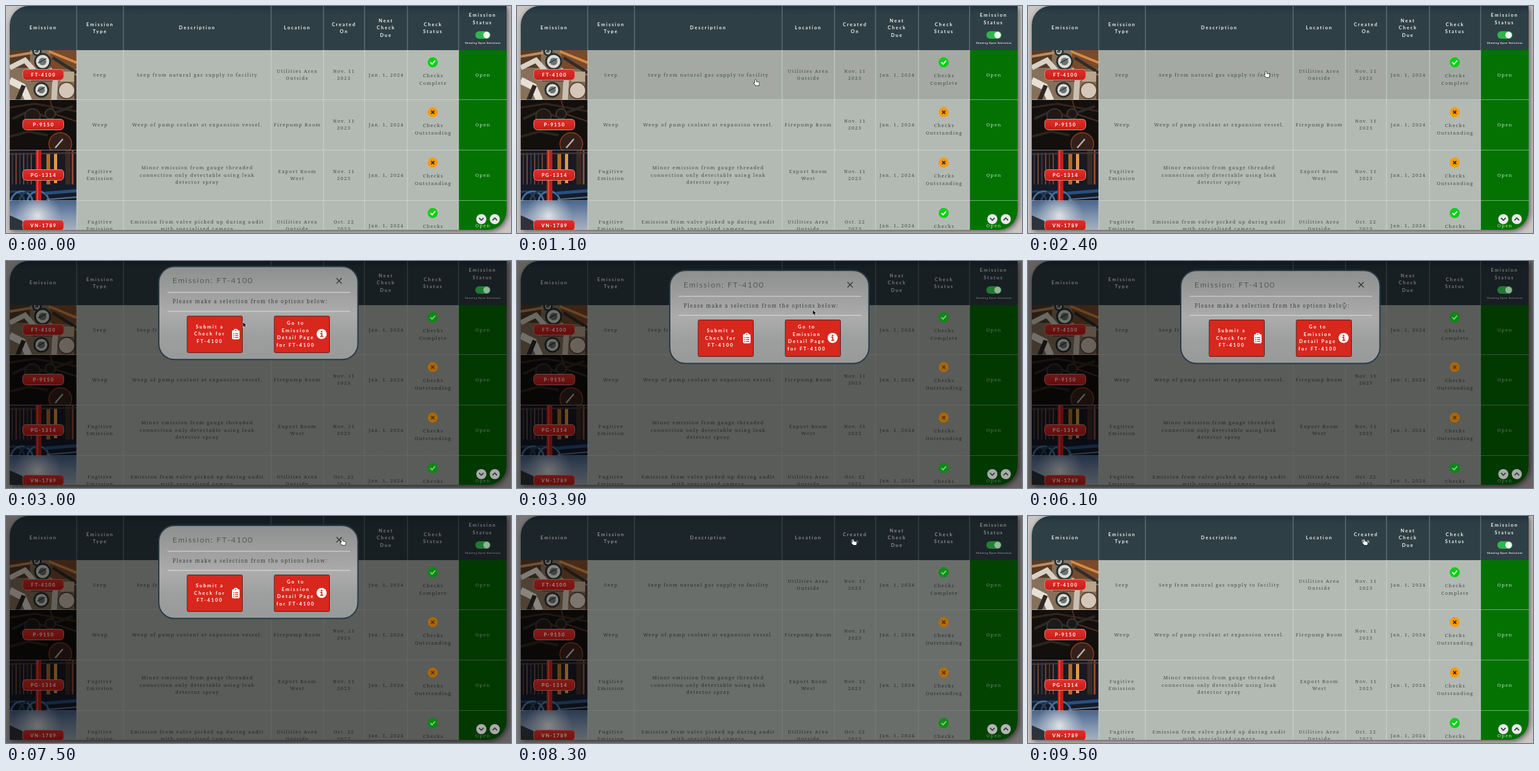
An HTML page with a canvas that plays this animation: 800 by 360 pixels, repeating every 9600 ms.

```html
<!DOCTYPE html>
<html lang="en">
<head>
<meta charset="utf-8">
<title>Emissions</title>
<style>
html, body { margin: 0; width: 100%; height: 100%; overflow: hidden; background: #cbc5c3; }
canvas { display: block; }
</style>
</head>
<body>
<canvas id="stage" width="800" height="360"></canvas>
<script>
const ctx = document.getElementById('stage').getContext('2d');
const LOOP = 9600;
const COLS = [6, 112, 186, 420, 503, 568, 636, 717, 793];
const ROWS = [70, 149, 229, 309, 389];
const BOTTOM = 355;
const LEADING = 11.5;

const SANS = 'Lato, sans-serif', SERIF = '"Noto Serif", serif';
const HEAD = { font: `bold 7.5px ${SANS}`, spacing: 1.75, color: '#f0f3f3' };
const BODY = { font: `300 7.5px ${SERIF}`, spacing: 1.3, color: '#454a47' };
const OPEN = { ...BODY, color: '#c6dcc4' };
const TAG = { ...HEAD, spacing: 1.55, color: '#fff' };
const ACTION = { ...HEAD, spacing: 1.9, color: '#fff' };
const TINY = { font: `bold 4px ${SANS}`, spacing: 0.55, color: '#fff' };
const TITLE = { font: `300 12.5px ${SANS}`, spacing: 1.6, color: '#22282b', drop: 4.5 };
const PROMPT = { font: `300 8px ${SERIF}`, spacing: 1.35, color: '#3c4042' };

const headings = ['Emission', 'Emission|Type', 'Description', 'Location', 'Created|On',
  'Next|Check|Due', 'Check|Status', 'Emission|Status'];
const records = [
  { tag: 'FT-4100', done: true, photo: gauges,
    cells: ['Seep', 'Seep from natural gas supply to facility', 'Utilities Area|Outside', 'Nov. 11|2023'] },
  { tag: 'P-9150', done: false, photo: pump,
    cells: ['Weep', 'Weep of pump coolant at expansion vessel.', 'Firepump Room', 'Nov. 11|2023'] },
  { tag: 'PG-1314', done: false, photo: pipework,
    cells: ['Fugitive|Emission', 'Minor emission from gauge threaded|connection only detectable using leak|detector spray', 'Export Room|West', 'Nov. 11|2023'] },
  { tag: 'VN-1789', done: true, photo: sky,
    cells: ['Fugitive|Emission', 'Emission from valve picked up during audit|with specialised camera', 'Utilities Area|Outside', 'Oct. 22|2023'] }
];

const clamp = v => Math.max(0, Math.min(1, v));
const ramp = (t, from, to) => clamp((t - from) / (to - from));
const easeOut = p => 1 - (1 - p) ** 2;
const smooth = p => p * p * (3 - 2 * p);

function rect(x, y, w, h, fill) {
  ctx.fillStyle = fill;
  ctx.fillRect(x, y, w, h);
}

function paint(fill, stroke, width) {
  if (fill) { ctx.fillStyle = fill; ctx.fill(); }
  if (stroke) { ctx.strokeStyle = stroke; ctx.lineWidth = width; ctx.stroke(); }
}

function box(x, y, w, h, radii, fill, stroke, width = 1) {
  ctx.beginPath();
  ctx.roundRect(x, y, w, h, radii);
  paint(fill, stroke, width);
}

function disc(x, y, r, fill, stroke, width = 1) {
  ctx.beginPath();
  ctx.arc(x, y, r, 0, Math.PI * 2);
  paint(fill, stroke, width);
}

function line(points, color, width) {
  ctx.beginPath();
  for (let i = 0; i < points.length; i += 2) ctx.lineTo(points[i], points[i + 1]);
  paint(null, color, width);
}

function vertical(y0, y1, ...colors) {
  const g = ctx.createLinearGradient(0, y0, 0, y1);
  colors.forEach((c, i) => g.addColorStop(i / (colors.length - 1), c));
  return g;
}

function text(str, x, y, style, align = 'center') {
  const lines = str.split('|');
  ctx.font = style.font;
  ctx.letterSpacing = style.spacing + 'px';
  ctx.fillStyle = style.color;
  ctx.textAlign = align;
  lines.forEach((s, i) =>
    ctx.fillText(s, x, y + (i - (lines.length - 1) / 2) * LEADING + (style.drop || 2.6)));
}

// Row pictures, drawn in a 106 x 80 cell
function dial(x, y, r) {
  disc(x, y, r, '#dcdcd6', '#2b3130', 3);
  disc(x, y, r * 0.5, '#6d7472');
  line([x - r * 0.6, y + r * 0.2, x + r * 0.5, y - r * 0.4], '#2b3130', 1.2);
}

function gauges() {
  rect(0, 0, 106, 80, '#86705a');
  rect(0, 0, 32, 28, '#553c29');
  rect(64, 0, 42, 30, '#7a4a2a');
  line([0, 10, 36, 4], '#c08a5c', 4);
  line([62, 2, 106, 20], '#d38b48', 4);
  line([68, 12, 106, 36], '#2f2d2a', 5);
  line([0, 28, 24, 16, 40, 34], '#d8d2c6', 8);
  line([70, 80, 72, 46, 62, 30], '#c9bfb2', 9);
  line([0, 48, 20, 58, 30, 80], '#e6e0d6', 11);
  line([12, 80, 22, 56], '#2d2825', 7);
  rect(34, 38, 34, 12, '#5c5146');
  rect(44, 30, 16, 16, '#88857d');
  dial(52, 18, 12);
  dial(43, 2, 6);
  dial(50, 63, 11);
  rect(80, 34, 22, 16, '#b9a48c');
  disc(90, 64, 13, '#d4c6b8', '#5d4837', 2);
  rect(102, 40, 4, 40, '#4a3a2e');
}

function pump() {
  rect(0, 0, 106, 80, '#120f0d');
  line([0, 12, 40, 6, 106, 18], '#36241b', 3);
  line([4, 30, 30, 18, 56, 26, 100, 10], '#2b2826', 4);
  line([64, 0, 70, 22, 106, 34], '#4b3024', 2);
  disc(36, 26, 12, '#1d1a18', '#38332f', 2);
  disc(64, 22, 8, '#1b1917', '#403831', 2);
  line([0, 58, 30, 50, 60, 56], '#2b241f', 4);
  disc(80, 70, 18, '#33201a', '#8f3c1c', 1.5);
  line([72, 76, 84, 62], '#b8b2a8', 2.5);
}

function pipework() {
  rect(0, 0, 106, 80, '#1a1921');
  for (let i = 0; i < 6; i++) rect(3 + i * 6, 4, 2, 50, i % 2 ? '#6c4632' : '#393640');
  rect(58, 5, 6, 50, '#b26a25');
  rect(70, 4, 5, 48, '#dc9a48');
  rect(88, 0, 8, 60, '#3b2a27');
  rect(98, 0, 3, 56, '#8a4930');
  line([0, 6, 106, 4], '#4b3839', 2);
  rect(0, 54, 106, 26, '#161b28');
  for (let i = 0; i < 4; i++) disc(6 + i * 13, 82, 17, null, i % 2 ? '#456f99' : '#223f60', 3);
  line([56, 68, 106, 64], '#284f7e', 5);
  line([58, 78, 106, 74], '#55789a', 2);
  rect(41, 0, 9, 80, '#bd201c');
  rect(43, 0, 2, 80, '#e24a3a');
}

function sky() {
  rect(0, 0, 106, 80, vertical(0, 48, '#4a658e', '#7f92ad', '#aab3bf'));
  const glow = ctx.createRadialGradient(44, 24, 2, 44, 24, 38);
  glow.addColorStop(0, 'rgba(228,230,231,.9)');
  glow.addColorStop(1, 'rgba(200,208,218,0)');
  rect(0, 0, 106, 80, glow);
  ctx.fillStyle = '#2e333b';
  ctx.beginPath();
  [[0, 23], [20, 32], [26, 48], [0, 48]].forEach(p => ctx.lineTo(...p));
  ctx.fill();
}

function statusIcon(x, y, done) {
  disc(x, y, 8, done ? '#0bd016' : '#ff9a0a');
  if (done) line([x - 3.7, y, x - 1, y + 2.8, x + 3.8, y - 2.6], '#fff', 1.8);
  else {
    line([x - 2.5, y - 2.5, x + 2.5, y + 2.5], '#2c2b28', 1.7);
    line([x + 2.5, y - 2.5, x - 2.5, y + 2.5], '#2c2b28', 1.7);
  }
}

function toggle() {
  box(743.5, 40, 24, 12, 6, '#2fb64b');
  disc(761.3, 46, 5.2, '#f3f6f3');
}

function brightParts() {
  toggle();
  records.forEach((r, i) => statusIcon(676, ROWS[i] + 19.3, r.done));
}

function header() {
  rect(6, 0, 787, 70.5, vertical(0, 14, '#1f303a', '#2a3b44', '#2f3f46'));
  headings.forEach((h, i) =>
    text(h, (COLS[i] + COLS[i + 1]) / 2, i === 7 ? 20.5 : 34.7, HEAD));
  text('Showing Open Emissions', 755.5, 57.3, TINY);
  for (const x of COLS.slice(1, -1)) rect(x - 0.5, 0, 1, 70, '#76828a');
}

function row(rec, i, hovered) {
  const top = ROWS[i], height = ROWS[i + 1] - top, mid = top + 39;
  rect(6, top, 711, height, hovered ? '#a4aaa3' : '#b3bab4');
  rect(717, top, 76, height, '#037203');

  ctx.save();
  ctx.beginPath();
  ctx.rect(6, top, 106, height);
  ctx.clip();
  ctx.translate(6, top);
  rec.photo();
  ctx.restore();

  box(26.5, mid - 8.5, 65, 17, [5, 5, 6, 6], vertical(mid - 9, mid + 9, '#e2302a', '#c51d18'), '#d98a82');
  text(rec.tag, 59.5, mid, TAG);
  rec.cells.forEach((c, n) => text(c, (COLS[n + 1] + COLS[n + 2]) / 2, mid, BODY));
  text('Jan. 1, 2024', 602.5, mid, BODY);
  text('Checks|' + (rec.done ? 'Complete' : 'Outstanding'), 676.8, top + 46.5, BODY);
  text('Open', 755.5, mid, OPEN);
  for (const x of COLS.slice(1, -1)) rect(x - 0.5, top, 1, height, 'rgba(222,228,224,.65)');
  if (i) {
    ctx.setLineDash([1, 1]);
    line([6, top - 0.5, 793, top - 0.5], '#dfe4e0', 1);
    ctx.setLineDash([]);
  }
}

function table(hoverRow) {
  rect(0, 0, 800, 360, '#cbc5c3');
  ctx.save();
  ctx.shadowColor = 'rgba(0,0,0,.6)';
  ctx.shadowBlur = 8;
  ctx.shadowOffsetX = ctx.shadowOffsetY = 2;
  box(6, 0, 787, BOTTOM, [30, 0, 30, 0], '#b3bab4');
  ctx.restore();

  ctx.save();
  ctx.beginPath();
  ctx.roundRect(6, 0, 787, BOTTOM, [30, 0, 30, 0]);
  ctx.clip();
  header();
  records.forEach((r, i) => row(r, i, i === hoverRow));
  brightParts();
  ctx.restore();
}

function scrollButtons(dim) {
  const shade = 232 - 62 * dim;
  for (const [x, dir] of [[753, 1], [774.3, -1]]) {
    disc(x, 338, 8, `rgb(${shade},${shade},${shade})`);
    line([x - 3.6, 338 - 1.8 * dir, x, 338 + 1.8 * dir, x + 3.6, 338 - 1.8 * dir], '#30383b', 1.7);
  }
}

function modal(dy, alpha) {
  ctx.save();
  ctx.globalAlpha = alpha;
  ctx.translate(0, dy);
  box(242, 15, 315.5, 147.5, 25, vertical(15, 163, '#8d8f8f', '#9c9d9c', '#abacab', '#9d9e9e', '#989a9a'), '#293b49', 2);
  text('Emission: FT-4100', 264, 37, TITLE, 'left');
  line([523.5, 33.5, 531.8, 41.8], '#33383b', 1.4);
  line([531.8, 33.5, 523.5, 41.8], '#33383b', 1.4);
  rect(256, 55.5, 289, 1, '#dedede');
  rect(256, 85.7, 289, 1, '#dedede');
  text('Please make a selection from the options below:', 264, 71, PROMPT, 'left');

  for (const x of [287, 425]) box(x, 93.5, 87.5, 58, 2, '#d8271d', '#51201d');
  text('Submit a|Check for|FT-4100', 322.8, 122, ACTION);
  text('Go to|Emission|Detail Page|for FT-4100', 459, 122, ACTION);

  box(358, 116, 12, 14.5, 2, '#fff');
  box(361, 114, 6, 4.5, 1.5, '#fff');
  disc(364, 116.3, 0.9, '#d8271d');
  for (const y of [121, 124, 127]) {
    rect(360, y, 1.5, 1.4, '#d8271d');
    rect(362.8, y, 5.2, 1.2, '#d8271d');
  }
  disc(500, 122, 8, '#fff');
  disc(500, 118.2, 1.3, '#d8271d');
  line([498, 121.2, 500.3, 121.2, 500.3, 125.6], '#d8271d', 1.7);
  line([497.7, 125.7, 502.6, 125.7], '#d8271d', 1.6);
  ctx.restore();
}

const CURSORS = {
  hand: 'M0 .8 Q0 0 .9 0 Q1.7 0 1.7 .8 V3.2 L5.8 3.9 Q6.7 4.2 6.6 5.3 L6 9 H1.4 L-1.9 5.5 Q-2 4.6 -1 4.7 L0 5.4 Z',
  arrow: 'M0 0 V7.2 L1.7 5.7 L2.9 8.3 L4 7.8 L2.9 5.2 H5.1 Z'
};

function cursor(kind, x, y) {
  ctx.save();
  ctx.translate(x, y);
  if (kind === 'beam') {
    line([0, -4, 0, 4], '#eee', 2.4);
    line([-1.5, -4, 1.5, -4], '#222', 0.9);
    line([0, -4, 0, 4], '#222', 0.9);
    line([-1.5, 4, 1.5, 4], '#222', 0.9);
  } else {
    const path = new Path2D(CURSORS[kind]);
    ctx.fillStyle = kind === 'hand' ? '#fff' : '#111';
    ctx.strokeStyle = kind === 'hand' ? '#222' : '#ddd';
    ctx.lineWidth = 1.4;
    ctx.stroke(path);
    ctx.fill(path);
  }
  ctx.restore();
}

// Each move: start, end, then the place reached
const ENTER = 500;
const moves = [[ENTER, 1000, 377, 117], [2100, 2600, 375.5, 97], [3300, 4200, 501, 71], [6300, 6900, 531.5, 37]];

function pointerAt(t) {
  let x = 430, y = 372;
  for (const [from, to, nx, ny] of moves) {
    const p = smooth(ramp(t, from, to));
    x += (nx - x) * p;
    y += (ny - y) * p;
  }
  return { x, y };
}

function draw(t) {
  const pointer = pointerAt(t);
  const present = t >= ENTER;
  const dim = ramp(t, 2700, 2850) * (1 - ramp(t, 8275, 8425));
  const shown = ramp(t, 2850, 3000) * (1 - ramp(t, 8020, 8170));
  const slide = easeOut(ramp(t, 2850, 3150)) * (1 - easeOut(ramp(t, 8020, 8320)));
  const hoverable = present && !dim && pointer.y < BOTTOM;
  const hoverRow = hoverable ? ROWS.findIndex((y, i) => pointer.y >= y && pointer.y < ROWS[i + 1]) : -1;

  table(hoverRow);
  if (dim) {
    rect(0, 0, 800, 360, `rgba(0,0,0,${0.5 * dim})`);
    ctx.globalAlpha = 0.35 * dim;
    brightParts();
    ctx.globalAlpha = 1;
  }
  scrollButtons(dim);
  if (shown) modal(-25 * (1 - slide), shown);

  if (!present) return;
  const overText = shown > 0 && pointer.x > 470 && pointer.x < 517 && pointer.y > 64 && pointer.y < 78;
  const kind = overText ? 'beam' : dim && t < 6700 ? 'arrow' : 'hand';
  cursor(kind, pointer.x, pointer.y);
}

const start = performance.now();
function tick() {
  draw((performance.now() - start) % LOOP);
  requestAnimationFrame(tick);
}
tick();
</script>
</body>
</html>
```
